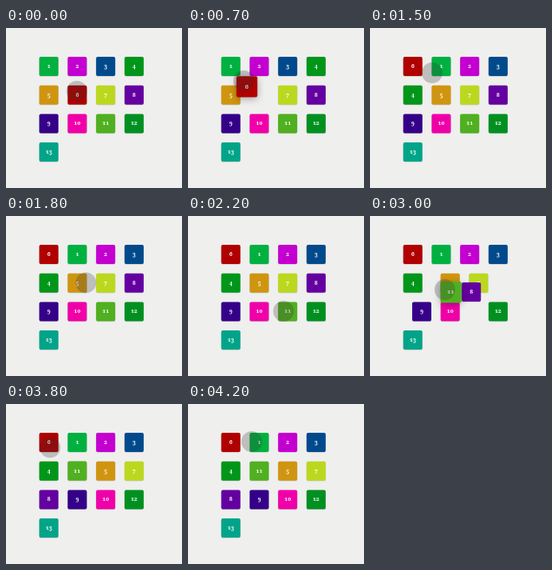
These frames come from a looping animation (221x200 px, 4500 ms). An HTML page:

```html
<!DOCTYPE html>
<html>
<head>
<meta charset="utf-8">
<style>
  html, body { margin: 0; width: 100%; height: 100%; overflow: hidden; background: #efefee; }
  div { position: absolute; left: 0; top: 0; }
  .tile {
    width: 23.5px; height: 23.5px; margin: -11.75px; border-radius: 2px;
    font: bold 7px/23.5px "Noto Serif", serif; font-variant-numeric: oldstyle-nums;
    color: #fff; text-align: center;
  }
  #cursor { width: 26px; height: 26px; margin: -13px; border-radius: 50%; background: rgba(50, 50, 50, .26); z-index: 3; }
</style>
</head>
<body>
<div id="cursor"></div>
<script>
const LOOP = 4500, FRAME = 100, LAG = 45, REFLOW = 600, DROP = 250;
const colors = ['#00b140', '#c400d0', '#004a8c', '#00961a', '#d09510', '#b00000', '#bcd81e',
  '#6400a0', '#350088', '#f000a8', '#50b020', '#009020', '#00a488'];

// Cursor path: time, x, y
const path = [
  [0, 89, 79], [450, 89, 79], [700, 70, 66], [1000, 55, 50], [1100, 48, 45], [1200, 49, 46],
  [1500, 78, 56], [1850, 104, 88], [2200, 120, 119], [2550, 120, 119], [3000, 94, 92],
  [3400, 84, 80.5], [3600, 84, 81], [3900, 41, 41], [4200, 80, 47], [LOOP, 80, 47]
];
const drags = [
  { tile: 5, to: 0, grab: 450, reflow: 880, release: 1200, dx: .5, dy: 5 },
  { tile: 10, to: 5, grab: 2550, reflow: 2875, release: 3600, dx: 5, dy: .5 }
];

const clamp = v => Math.max(0, Math.min(1, v));
const mix = (a, b, p) => a + (b - a) * p;
const mixPoint = (a, b, p) => [mix(a[0], b[0], p), mix(a[1], b[1], p)];
const slot = i => [53.75 + 35.7 * (i % 4), 48 + 35.7 * Math.floor(i / 4)];

// The CSS "ease" curve
function ease(x) {
  let lo = 0, hi = 1;
  for (let i = 0; i < 20; i++) {
    const s = (lo + hi) / 2;
    if (.75 * s * (1 - s) ** 2 + .75 * s * s * (1 - s) + s ** 3 < x) lo = s; else hi = s;
  }
  return .3 * lo * (1 - lo) ** 2 + 3 * lo * lo * (1 - lo) + lo ** 3;
}

function cursorAt(t) {
  const i = Math.max(1, path.findIndex(k => k[0] >= t));
  const [a, b] = [path[i - 1], path[i]];
  return mixPoint(a.slice(1), b.slice(1), clamp((t - a[0]) / (b[0] - a[0])));
}

const orders = [colors.map((_, i) => i)];
for (const d of drags) {
  const order = orders[orders.length - 1].filter(n => n !== d.tile);
  order.splice(d.to, 0, d.tile);
  orders.push(order);
}

const cursor = document.getElementById('cursor');
const tiles = colors.map((color, i) => {
  const el = document.createElement('div');
  el.className = 'tile';
  el.textContent = i + 1;
  el.style.background = color;
  return document.body.appendChild(el);
});

const place = (el, [x, y], scale = 1) => {
  el.style.transform = `translate(${x}px, ${y}px) scale(${scale})`;
};

function heldPoint(d, t) {
  const [x, y] = cursorAt(Math.max(d.grab, t - LAG));
  return [x + d.dx, y + d.dy];
}

function render(t) {
  place(cursor, cursorAt(t));
  tiles.forEach((el, n) => {
    let pos = slot(n), lift = 0;
    drags.forEach((d, k) => {
      const target = slot(orders[k + 1].indexOf(n));
      if (n !== d.tile) {
        pos = mixPoint(pos, target, ease(clamp((t - d.reflow) / REFLOW)));
      } else if (t > d.grab) {
        const drop = ease(clamp((t - d.release) / DROP));
        pos = mixPoint(heldPoint(d, Math.min(t, d.release)), target, drop);
        lift = clamp((t - d.grab) / 200) * (1 - drop);
      }
    });
    // A later drag may shift a tile that was dropped earlier
    place(el, pos, 1 + .1 * lift);
    el.style.zIndex = lift > 0 ? 2 : 1;
    el.style.boxShadow = `0 ${mix(.5, 2, lift)}px ${mix(1, 9, lift)}px rgba(0, 0, 0, ${mix(.2, .3, lift)})`;
  });
}

function tick() {
  render(Math.floor(performance.now() % LOOP / FRAME) * FRAME);
  requestAnimationFrame(tick);
}
tick();
</script>
</body>
</html>
```
